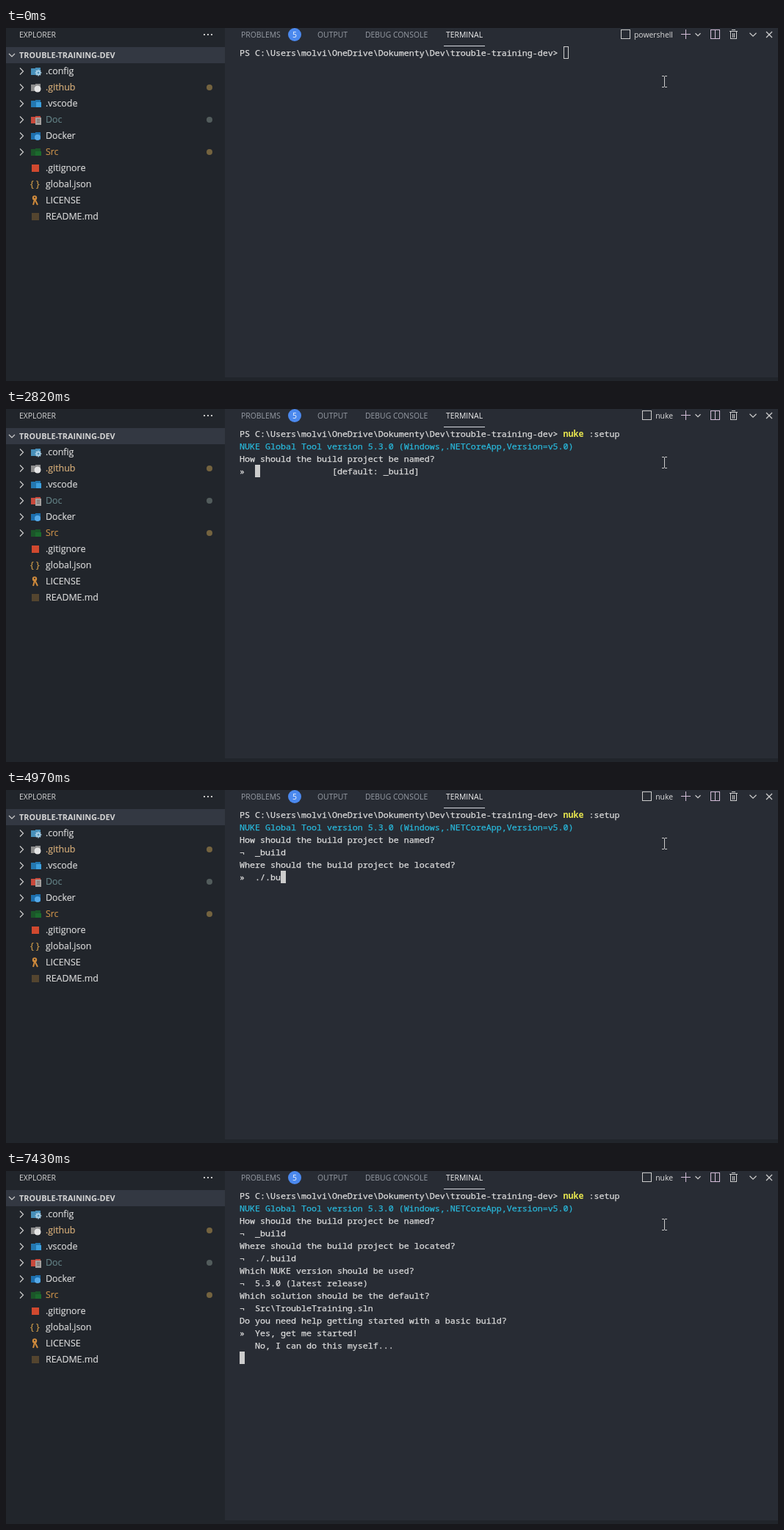
An HTML page with a canvas for the animation above (8000 ms loop, 1051 px wide and 481 px high).

```html
<!DOCTYPE html>
<html lang="en">
<head>
<meta charset="utf-8">
<title>Build setup in a terminal</title>
<style>
html, body { margin: 0; width: 100%; height: 100%; overflow: hidden; background: #282c34; }
#stage { position: relative; width: 1051px; height: 481px; overflow: hidden; }
canvas { position: absolute; left: 0; top: 0; }
.label { position: absolute; white-space: pre; font-family: "Open Sans", "Noto Sans", sans-serif; }
.small { font-size: 10.4px; line-height: 18px; }
.title { font-size: 10.8px; line-height: 18px; font-weight: 700; }
.file { font-size: 12.4px; line-height: 22px; -webkit-text-stroke: .15px; }
#tab { left: auto; right: 143px; top: 0; color: #dcdcdc; }
#term { position: absolute; left: 318px; top: 25px; margin: 0; color: #dcdcdc; white-space: pre;
  font: 11.667px/17px "Noto Sans Mono", "DejaVu Sans Mono", monospace; font-variant-ligatures: none;
  -webkit-text-stroke: .25px; }
#term div { height: 17px; }
#term div:nth-child(2) { color: #29b8db; }
#term b { color: #e6e44e; font-weight: 600; -webkit-text-stroke: 0; }
#cursor { position: absolute; box-sizing: border-box; width: 7px; height: 17px; border: 1px solid #ccc; }
</style>
</head>
<body>
<div id="stage">
  <canvas id="art" width="1051" height="481"></canvas>
  <div id="tab" class="label small"></div>
  <div id="term"></div>
  <div id="cursor"></div>
</div>
<script>
const LOOP = 8000, CELL = 7, ROW = 17;
const $ = id => document.getElementById(id);
const stage = $('stage'), term = $('term'), cursor = $('cursor'), tab = $('tab');
const g = $('art').getContext('2d');

function label(x, y, text, color, kind) {
  const el = document.createElement('div');
  el.className = 'label ' + kind;
  el.textContent = text;
  el.style.cssText = `left:${x}px;top:${y}px;color:${color}`;
  stage.append(el);
}
function rect(x, y, w, h, color) {
  g.fillStyle = color;
  g.fillRect(x, y, w, h);
}
function disc(x, y, r, color) {
  g.fillStyle = color;
  g.beginPath();
  g.arc(x, y, r, 0, 7);
  g.fill();
}
function line(color, width, ...points) {
  g.strokeStyle = color;
  g.lineWidth = width;
  g.beginPath();
  for (let i = 0; i < points.length; i += 2) g.lineTo(points[i], points[i + 1]);
  g.stroke();
}
function box(x, y, w, h, color) {
  g.strokeStyle = color;
  g.lineWidth = 1;
  g.strokeRect(x + .5, y + .5, w - 1, h - 1);
}
const down = (x, y, r) => line('#ccc', 1.2, x - r, y - r / 2, x, y + r / 2, x + r, y - r / 2);

function folder(y, color) {
  rect(34, y - 4, 13, 9, color);
  rect(40, y - 5, 7, 1, color);
}

const badge = {
  gear(y) {
    disc(44, y + 2, 3.4, '#a3cbe3');
    for (let a = 0; a < 4; a++) {
      const c = 4.4 * Math.cos(a * Math.PI / 4), s = 4.4 * Math.sin(a * Math.PI / 4);
      line('#a3cbe3', 1.5, 44 - c, y + 2 - s, 44 + c, y + 2 + s);
    }
    disc(44, y + 2, 1.3, '#4d91b8');
  },
  white: y => disc(43, y + 2, 4.5, '#e4e4e4'),
  blue: y => rect(41, y - 2, 7, 7, '#3d9fdd'),
  page(y) {
    rect(40, y - 3, 8, 10, '#a5a19f');
    for (let i = 0; i < 3; i++) rect(42, y - 1 + i * 2, 4, 1, '#6b6867');
  },
  sky: y => disc(43, y + 2, 4, '#55a9e8'),
  green: y => rect(40, y - 1, 8, 6, '#1b6a2d')
};

const folders = [
  ['.config', '#dcdcdc', '#478fb9', 'gear'],
  ['.github', '#dcb27c', '#8d8d8d', 'white', '#74633f'],
  ['.vscode', '#dcdcdc', '#2377b0', 'blue'],
  ['Doc', '#648387', '#c8493b', 'page', '#525c5c'],
  ['Docker', '#dcdcdc', '#1d6fae', 'sky'],
  ['Src', '#c9904a', '#1b5629', 'green', '#74633f']
];
const files = ['.gitignore', 'global.json', 'LICENSE', 'README.md'];

function drawSidebar() {
  rect(0, 0, 298, 481, '#21252b');
  rect(0, 26, 298, 22, '#333842');
  rect(0, 476, 1051, 5, '#21252b');
  label(18, 0, 'EXPLORER', '#d4d4d4', 'small');
  label(18, 28, 'TROUBLE-TRAINING-DEV', '#d4d4d4', 'title');
  for (let i = 0; i < 3; i++) rect(269 + i * 5, 8, 2, 2, '#ccc');
  down(8, 37, 4);
  folders.forEach(([name, color, fill, mark, dot], i) => {
    const y = 59 + i * 22;
    line('#ccc', 1.2, 19, y - 4.5, 23.5, y, 19, y + 4.5);
    folder(y, fill);
    badge[mark](y);
    if (dot) disc(277, y, 4, dot);
    label(54, y - 11, name, color, 'file');
  });
  files.forEach((name, i) => label(54, 180 + i * 22, name, '#dcdcdc', 'file'));
  rect(35, 186, 10, 10, '#d0492f');
  label(33, 202, '{ }', '#d5a04c', 'file');
  // key
  disc(39, 231.5, 3.2, '#cf8a3c');
  disc(39, 231, 1, '#21252b');
  line('#cf8a3c', 2, 39, 234, 37, 241);
  line('#cf8a3c', 2, 39.5, 234, 43, 241);
  rect(35, 252, 10, 10, '#54452f');
}

function drawPanel() {
  const dim = '#979ca5', pale = '#d3bdd8';
  label(320, 0, 'PROBLEMS', dim, 'small');
  label(424, 0, 'OUTPUT', dim, 'small');
  label(489, 0, 'DEBUG CONSOLE', dim, 'small');
  label(599, 0, 'TERMINAL', '#f0f0f0', 'small');
  rect(596, 24, 56, 1, '#d7dae0');
  disc(393, 9, 9, '#4b89ee');
  label(390, 0, '5', '#f0f4fb', 'small');

  rect(919, 8, 13, 1, pale);
  rect(925, 2, 1, 13, pale);
  down(942, 9, 3.5);
  box(959, 2, 13, 13, pale);
  rect(965, 2, 1, 13, pale);
  // trash can
  rect(985, 4, 11, 1, '#ccc');
  rect(988, 2, 5, 1, '#ccc');
  box(986, 4, 9, 11, '#ccc');
  rect(989, 7, 1, 6, '#ccc');
  rect(991, 7, 1, 6, '#ccc');
  down(1017, 9, 4.5);
  line('#ccc', 1.2, 1035, 5, 1043, 13);
  line('#ccc', 1.2, 1043, 5, 1035, 13);
  // text pointer
  rect(896, 66, 1, 14, '#ccc');
  for (const y of [65, 80]) {
    rect(893, y, 3, 1, '#ccc');
    rect(897, y, 3, 1, '#ccc');
  }
}

const prompt = 'PS C:\\Users\\molvi\\OneDrive\\Dokumenty\\Dev\\trouble-training-dev&gt; ';
const ask = (text, hint) => [text, '»'.padEnd(18) + `[default: ${hint}]`];
const done = text => '¬  ' + text;

// each step: time, first row replaced, new rows, cursor row, cursor column
const steps = [
  [0, 0, [prompt], 0, 63],
  [1570, 0, [prompt + '<b>nuke</b> :setup'], 0, 74],
  [2230, 1, [], 1, 0],
  [2360, 1, ['NUKE Global Tool version 5.3.0 (Windows,.NETCoreApp,Version=v5.0)'], 2, 0],
  [2820, 2, ask('How should the build project be named?', '_build'), 3, 3],
  [3780, 3, [done('_build'), ...ask('Where should the build project be located?', './build')], 5, 3],
  ...[4240, 4440, 4640, 4770, 4970, 5100, 5170, 5240].map((t, i) =>
    [t, 5, ['»  ' + './.build'.slice(0, i + 1)], 5, 4 + i]),
  [5520, 5, [done('./.build'), 'Which NUKE version should be used?', '»  5.3.0 (latest release)'], 8, 0],
  [6650, 7, [done('5.3.0 (latest release)'), 'Which solution should be the default?',
    '»  Src\\TroubleTraining.sln', '   None'], 11, 0],
  [7430, 9, [done('Src\\TroubleTraining.sln'), 'Do you need help getting started with a basic build?',
    '»  Yes, get me started!', '   No, I can do this myself...'], 13, 0]
];

function drawTab(name) {
  tab.textContent = name;
  const x = name === 'nuke' ? 865 : 836;
  rect(830, 0, 60, 20, '#282c34');
  box(x + 1, 2, 13, 13, '#ccc');
}

let shown = -1;
function render(t) {
  cursor.style.background = t < 1000 ? 'none' : '#ccc';
  const count = steps.filter(s => s[0] <= t).length;
  if (count === shown) return;
  shown = count;
  const rows = [];
  for (const [, first, lines] of steps.slice(0, count)) rows.splice(first, rows.length, ...lines);
  term.innerHTML = rows.map(r => `<div>${r}</div>`).join('');
  const [, , , row, col] = steps[count - 1];
  cursor.style.left = 318 + col * CELL + 'px';
  cursor.style.top = 25 + row * ROW + 'px';
  drawTab(t < 2230 ? 'powershell' : 'nuke');
}

drawSidebar();
drawPanel();
const start = performance.now();
function frame() {
  render((performance.now() - start) % LOOP);
  requestAnimationFrame(frame);
}
render(0);
requestAnimationFrame(frame);
</script>
</body>
</html>
```
